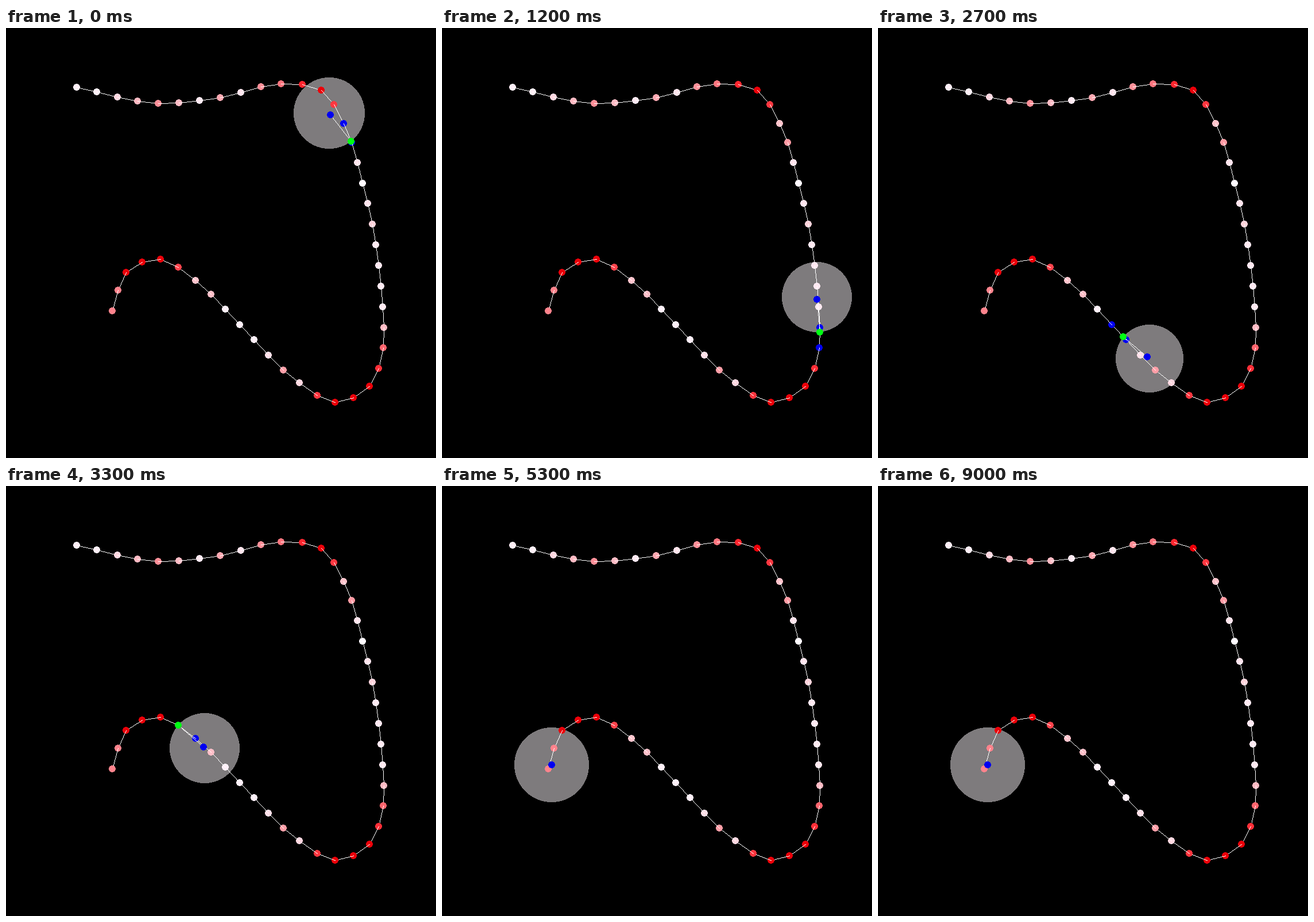
These frames come from a looping animation (749 px wide and 748 px high, 9100 ms). A matplotlib script:

```python
import numpy as np
import matplotlib.pyplot as plt
from matplotlib.animation import FuncAnimation
from matplotlib.collections import PolyCollection
from matplotlib.patches import Polygon

W, H, DPI = 749, 748, 64
FRAMES, INTERVAL = 91, 100
DOT = 6
REACH = 60       # lookahead distance that shapes the track
LAG = 1 / 6      # the halo trails the robot by one simulation step
FULL_RED = 18    # turn in degrees that makes a waypoint fully red
BLUE = "#0000f0"

# Waypoint index, x, y at the ends, straights and bends of the path.
BENDS = np.array([
    (0, 123, 103), (4, 265, 131), (7, 373, 121), (10, 479, 97),
    (12, 549, 108), (14, 588, 166), (17, 621, 270), (23, 656, 485),
    (25, 657, 556), (27, 633, 623), (29, 573, 651), (31, 511, 617),
    (35, 407, 516), (38, 330, 439), (40, 269, 402), (42, 209, 425),
    (44, 185, 492)], float)

# Frame, place passed, halo radius.
PACE = np.array([
    (0, 565, 151, 62), (10, 646, 421, 61), (12, 653, 472, 61),
    (20, 614, 621, 58), (21, 603, 626, 58), (33, 343, 454, 60.7),
    (40, 227, 425, 62), (45, 191, 485, 65)], float)
STOP = PACE[-1, 0]


def spline(t, knots, vals):
    """Cubic Hermite interpolation."""
    slope = np.gradient(vals, knots)
    i = np.clip(np.searchsorted(knots, t, "right") - 1, 0, len(knots) - 2)
    h = knots[i + 1] - knots[i]
    s = (t - knots[i]) / h
    return ((1 + 2 * s) * (1 - s) ** 2 * vals[i] + s * (1 - s) ** 2 * h * slope[i]
            + s * s * (3 - 2 * s) * vals[i + 1] + s * s * (s - 1) * h * slope[i + 1])


def lookahead(path, center, r):
    """Segment and point where the path leaves the circle."""
    d = np.hypot(*(path - center).T)
    exits = np.flatnonzero((d[:-1] <= r) & (d[1:] > r))
    if not len(exits):
        return len(path) - 2, path[-1]
    i = exits[-1]
    seg, off = path[i + 1] - path[i], path[i] - center
    a, b, c = seg @ seg, seg @ off, off @ off - r * r
    return i, path[i] + (np.sqrt(b * b - a * c) - b) / a * seg


def pursue(path, start, near=9.2):
    """Chase the lookahead point in one-pixel steps until close to the end."""
    trail = [np.array(start, float)]
    while np.hypot(*(path[-1] - trail[-1])) > near:
        way = lookahead(path, trail[-1], REACH)[1] - trail[-1]
        trail.append(trail[-1] + way / np.hypot(*way))
    return np.array(trail)


def tints(path):
    """White on straights, red in sharp bends."""
    step = np.diff(path, axis=0)
    heading = np.unwrap(np.arctan2(step[:, 1], step[:, 0]))
    turn = np.pad(np.abs(np.degrees(np.diff(heading))), 1, mode="edge")
    g = 1 - np.clip(turn / FULL_RED, 0, 1)
    return np.column_stack([np.where(g > 0, 1, 0.92), g, np.minimum(g + 0.035, 1)])


index = np.arange(BENDS[-1, 0] + 1)
path = np.rint(np.column_stack([spline(index, BENDS[:, 0], v) for v in BENDS[:, 1:].T]))
colors = tints(path)

trail = pursue(path, (563, 148))
passed = np.array([np.argmin(np.hypot(*(trail - p).T)) for p in PACE[:, 1:3]], float)


def trail_at(t):
    d = spline(np.minimum(t, STOP), PACE[:, 0], passed)
    return np.column_stack([np.interp(d, np.arange(len(trail)), v) for v in trail.T])


frames = np.arange(FRAMES)
robots, centers = trail_at(frames), trail_at(frames - LAG)
radii = np.interp(frames, PACE[:, 0], PACE[:, 3])

fig = plt.figure(figsize=(W / DPI, H / DPI), dpi=DPI, facecolor="black")
ax = fig.add_axes([0, 0, 1, 1])
ax.set(xlim=(0, W), ylim=(H, 0))
ax.axis("off")


def disc_outline(center, r=DOT):
    """Stair-stepped outline of a hard-edged disc."""
    r = int(round(r))
    row = np.arange(-r, r)
    half = np.repeat(np.rint(np.sqrt(r * r - (row + 0.5) ** 2)), 2)
    y = np.column_stack([row, row + 1]).ravel()
    right, left = np.column_stack([half, y]), np.column_stack([-half, y])
    return np.rint(center) + np.vstack([right, left[::-1]])


def line_pixels(p, q):
    """Unit squares of a one-pixel line."""
    p, q = np.rint(p), np.rint(q)
    n = int(np.abs(q - p).max()) + 1
    cells = np.rint(np.linspace(p, q, n))
    return cells[:, None] + np.array([(0, 0), (1, 0), (1, 1), (0, 1)])


def disc(color, z, center=(0, 0)):
    return ax.add_patch(Polygon(disc_outline(center), fc=color, lw=0, zorder=z))


def line(p, q, z):
    return ax.add_collection(
        PolyCollection(line_pixels(p, q), facecolors="white", linewidths=0, zorder=z))


dots = [disc(c, 2 * i, p) for i, (c, p) in enumerate(zip(colors, path))]
for i in range(len(path) - 1):
    line(path[i], path[i + 1], 2 * i + 1)

halo = disc("#7e7b7d", -1)
aim = line((0, 0), (0, 0), 200)
robot = disc(BLUE, 201)
target = disc("#00ff14", 202)


def draw(n):
    pos, center, r = robots[n], centers[n], radii[n]
    moving = n < STOP
    seg, goal = lookahead(path, center, r)
    for i, dot in enumerate(dots):
        dot.set_facecolor(BLUE if moving and i in (seg, seg + 1) else colors[i])
    halo.set_xy(disc_outline(center, r))
    robot.set_xy(disc_outline(pos))
    target.set_xy(disc_outline(goal))
    aim.set_verts(line_pixels(pos, goal))
    target.set_visible(moving)
    aim.set_visible(moving)
    return [halo, *dots, aim, robot, target]


anim = FuncAnimation(fig, draw, frames=FRAMES, interval=INTERVAL,
                     init_func=lambda: draw(0), repeat=True, repeat_delay=0)
plt.show()
```
